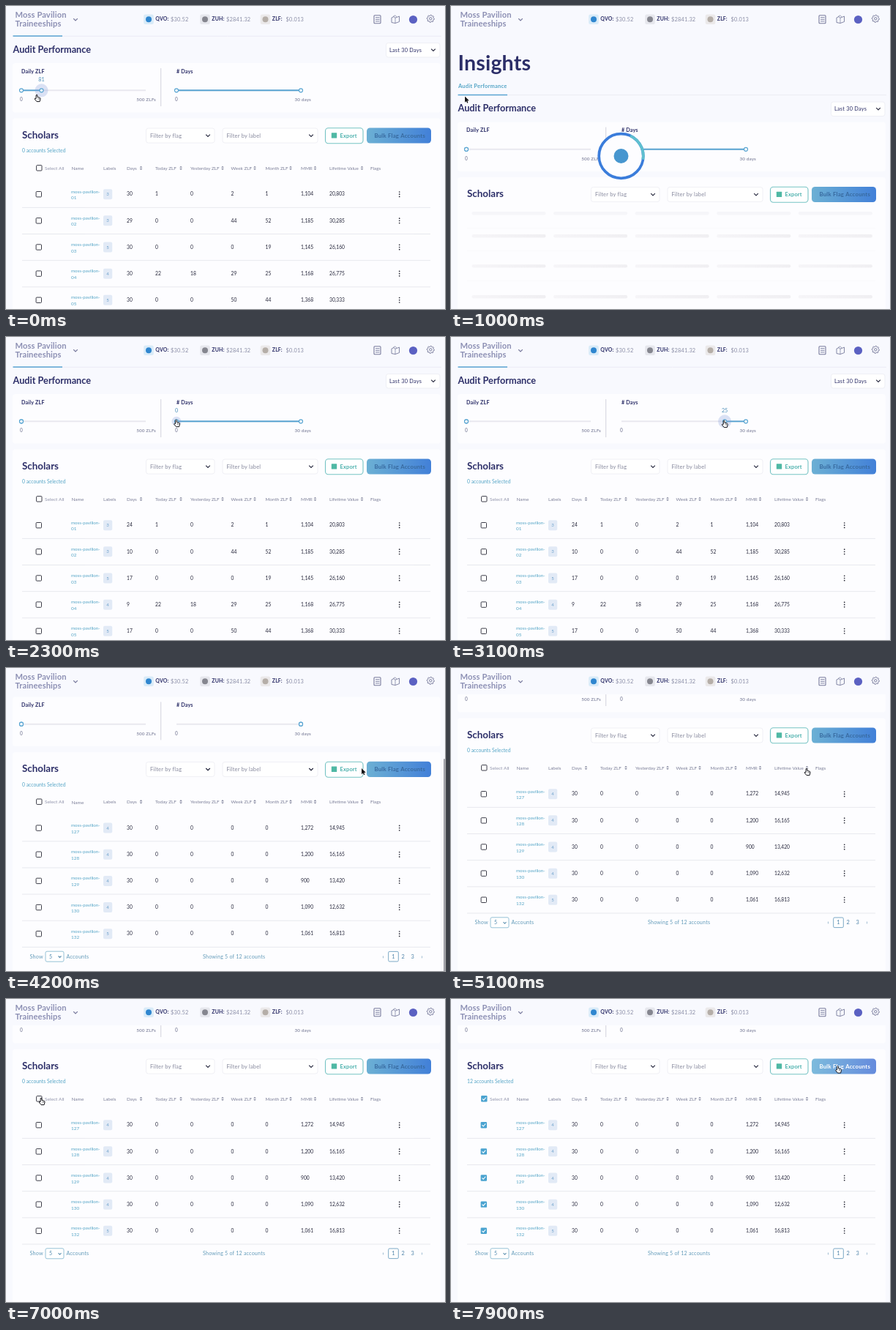
Animation, 600 px wide and 414 px high, one loop 8 s. Source, as an HTML page with a canvas:

```html
<!DOCTYPE html>
<html lang="en">
<head>
<meta charset="utf-8">
<title>Audit Performance</title>
<style>
html, body { margin: 0; width: 100%; height: 100%; overflow: hidden; background: #f8f9fe; }
canvas { display: block; width: 600px; height: 414px; }
</style>
</head>
<body>
<canvas id="stage"></canvas>
<script>
const W = 600, H = 414, LOOP = 8000, REST = 80.5;
const canvas = document.getElementById('stage');
const dpr = window.devicePixelRatio || 1;
canvas.width = W * dpr;
canvas.height = H * dpr;
const g = canvas.getContext('2d');

const NAVY = '#2c2e68', INK = '#303247', GREY = '#9093aa', TEAL = '#55a5c6', BLUE = '#5aa5d2';
const BG = '#f8f9fe', CARD = '#fdfdff', LINE = '#e6e7ed';
const COIN = 'ZLF';

// ---- motion ----
const clamp = (v, a = 0, b = 1) => Math.min(b, Math.max(a, v));
const mix = (a, b, k) => a + (b - a) * k;
const ease = k => k * k * (3 - 2 * k);
const within = (t, a, b) => t >= a && t < b;

function track(keys, t, curve = ease) {
  let i = keys.length - 1;
  while (i > 0 && keys[i][0] > t) i--;
  const a = keys[i], b = keys[i + 1];
  if (!b) return a.slice(1);
  const k = curve(clamp((t - a[0]) / (b[0] - a[0])));
  return a.slice(1).map((v, n) => mix(v, b[n + 1], k));
}

const POINTER = [
  [0, 42, 121], [600, 19, 123.5], [1500, 19, 123.5], [2150, 232.5, 113],
  [2400, 232.5, 113], [3350, 402, 114], [3650, 402, 114], [4120, 486, 137],
  [5350, 486, 137], [6600, 48, 135], [7230, 48, 135], [7800, 528.5, 91.5]
];
const HANDS = [[0, 800], [2100, 3550], [4600, 5450], [6500, 7300], [7650, 8000]];
const SCROLL = [[4000, REST], [4200, 119], [4650, 165.5]];

function stateAt(t) {
  const loading = within(t, 900, 1500) || within(t, 3600, 4000);
  return {
    t, loading,
    scroll: loading ? 0 : track(SCROLL, t, k => k)[0],
    daily: mix(48.5, 21, ease(clamp(t / 600))),
    days: mix(233, 403, ease(clamp((t - 2400) / 950))),
    dailyHover: t < 800,
    daysHover: within(t, 2150, 3550),
    pressed: t < 700 || within(t, 2400, 3450),
    checked: t >= 7200,
    pointer: track(POINTER, t),
    hand: HANDS.some(([a, b]) => within(t, a, b))
  };
}

// ---- drawing helpers ----
function text(s, x, y, size, color, { weight = 400, gap = 0, align = 'left' } = {}) {
  g.font = `${weight} ${size}px Lato, "Open Sans", sans-serif`;
  g.letterSpacing = gap + 'px';
  g.textAlign = align;
  g.fillStyle = color;
  g.fillText(s, x, y + size * 0.34);
}

function box(x, y, w, h, r, fill, stroke, lw = 1) {
  g.beginPath();
  g.roundRect(x, y, w, h, r);
  if (fill) { g.fillStyle = fill; g.fill(); }
  if (stroke) { g.strokeStyle = stroke; g.lineWidth = lw; g.stroke(); }
}

function path(pts, color, lw = 1) {
  g.beginPath();
  pts.forEach(([x, y]) => g.lineTo(x, y));
  g.strokeStyle = color;
  g.lineWidth = lw;
  g.stroke();
}

function dot(x, y, r, fill, stroke, lw = 1) {
  g.beginPath();
  g.arc(x, y, r, 0, Math.PI * 2);
  if (fill) { g.fillStyle = fill; g.fill(); }
  if (stroke) { g.strokeStyle = stroke; g.lineWidth = lw; g.stroke(); }
}

function fade(x, w, from, to) {
  const f = g.createLinearGradient(x, 0, x + w, 0);
  f.addColorStop(0, from);
  f.addColorStop(1, to);
  return f;
}

const chevron = (x, y, color = INK, r = 2.8) =>
  path([[x - r, y - r / 2], [x, y + r / 2], [x + r, y - r / 2]], color, 1.3);

function sorter(x, y) {
  g.fillStyle = '#85889f';
  for (const d of [-1, 1]) {
    g.beginPath();
    g.moveTo(x - 1.9, y + d * 0.6);
    g.lineTo(x + 1.9, y + d * 0.6);
    g.lineTo(x, y + d * 2.7);
    g.fill();
  }
}

function checkbox(x, y, on) {
  if (!on) return box(x - 3.7, y - 3.7, 7.4, 7.4, 1, '#fff', '#3c3d49', 1);
  box(x - 4.2, y - 4.2, 8.4, 8.4, 1.2, '#4aa3d0');
  path([[x - 2.3, y], [x - 0.6, y + 1.8], [x + 2.5, y - 1.8]], '#fff', 1.1);
}

// ---- page parts ----
function header() {
  g.fillStyle = BG;
  g.fillRect(0, 0, W, 36);
  const brand = { weight: 700, gap: 0.1 };
  text('Moss Pavilion', 12.5, 11.8, 11.2, '#8d90b4', brand);
  text('Traineeships', 12.5, 24.2, 11.2, '#8d90b4', brand);
  chevron(95, 18.5, '#77799d');
  const coins = [
    [195, 'QVO:', '$30.52', 225, '#2f86cf', '#d9ebf8'],
    [272, 'ZUH:', '$2841.32', 301, '#85868f', '#e6e7ed'],
    [354.5, COIN + ':', '$0.013', 382.5, '#b5aea8', '#ebe9ea']
  ];
  for (const [x, name, price, px, mark, back] of coins) {
    box(x - 6.8, 11.5, 13.6, 13.6, 2.5, back);
    dot(x, 18.3, 4, mark);
    text(name, x + 9.3, 18, 7, NAVY, { weight: 700, gap: 0.1 });
    text(price, px, 18, 7.4, '#8b8ea6', { gap: 0.2 });
  }
  const tone = '#787b9c';
  box(503, 12.8, 9, 11, 1, null, tone, 1.1);
  for (const y of [15.7, 18.3, 20.9]) path([[505, y], [510.5, y]], tone, 0.9);
  path([[527, 16], [530, 14.5], [532, 16.3], [537.5, 14], [537.5, 21.5], [532, 23.5], [527, 22.5], [527, 16]], tone, 0.9);
  path([[532, 16.3], [532, 23.5]], tone, 0.7);
  path([[529, 14.5], [532, 12.7], [534, 15]], tone, 0.7);
  dot(556.5, 18.5, 5.6, '#5b61c2');
  dot(580.3, 17.3, 1.7, null, tone, 1);
  g.beginPath();
  for (let i = 0; i <= 32; i++) {
    const a = i / 32 * Math.PI * 2, r = i % 4 < 2 ? 5.1 : 4;
    g.lineTo(580.3 + r * Math.cos(a), 17.3 + r * Math.sin(a));
  }
  g.stroke();
}

// `held` is the handle under the pointer: its x, value and halo radius
function slider(x, label, low, high, handles, fill, held) {
  const end = x + 170, y = 115.3;
  text(label, x, 89.3, 7.2, NAVY, { weight: 700, gap: 0.15 });
  path([[x, y], [end, y]], '#e9e8ef', 2);
  path(fill.map(v => [v, y]), BLUE, 1.9);
  if (held) {
    dot(held.x, y, held.r, 'rgba(130,155,215,.28)');
    text(held.value, held.x, 101, 7.2, '#4d8fb8', { align: 'center' });
  }
  for (const h of handles) dot(h, y, 2.5, '#fff', BLUE, 1.2);
  text(low, x - 2, 128, 6.6, GREY, { weight: 700 });
  text(high, end + 14, 128, 6.4, GREY, { align: 'right', weight: 700, gap: 0.1 });
}

function sliders(s) {
  const held = (on, x, from, max) => on &&
    { x, value: Math.round((x - from) / 170 * max), r: s.pressed ? 9 : 6.5 };
  slider(21, `Daily ${COIN}`, '0', `500 ${COIN}s`, [21, s.daily], [21, s.daily],
    held(s.dailyHover, s.daily, 21, 500));
  slider(233, '# Days', '0', '30 days', [s.days, 403], [s.days, 403],
    held(s.daysHover, s.days, 233, 30));
}

function filters(s) {
  text('Scholars', 22, 176.3, 13.4, NAVY, { weight: 700 });
  for (const [x, w, label] of [[191.5, 93.5, 'Filter by flag'], [296, 130, 'Filter by label']]) {
    box(x, 167, w, 20, 3, '#fff', '#f0f0f5');
    text(label, x + 5.5, 177, 7.4, '#85879c', { gap: 0.2 });
    chevron(x + w - 9, 177);
  }
  box(436.5, 166.8, 51.5, 21, 4, '#fff', '#76c3c4', 1.1);
  box(444.8, 173.2, 7.4, 7.4, 0.5, '#4fb8a4');
  text('Export', 456.5, 177, 7.4, '#4ab0ac', { weight: 700, gap: 0.2 });
  const [from, to] = s.checked ? ['#7dbbdc', '#658bdd'] : ['#6cb0d4', '#4280d8'];
  box(493, 166.4, 88, 21.2, 4.5, fade(493, 88, from, to));
  text('Bulk Flag Accounts', 503.5, 177, 7.8, s.checked ? '#fff' : '#386a9f', { weight: 700, gap: 0.2 });
}

const COLS = [165, 204, 252, 307.5, 354.5, 403, 442];
const HEADS = [
  ['Days', 184.5], [`Today ${COIN}`, 239], [`Yesterday ${COIN}`, 296], [`Week ${COIN}`, 340],
  [`Month ${COIN}`, 389], ['MMR', 422.5], ['Lifetime Value', 486.5]
];
// id, labels, days, today, yesterday, week, month, rating, lifetime
const FIRST = `01 3 30 1 0 2 1 1,104 20,803
02 3 29 0 0 44 52 1,185 30,285
03 5 30 0 0 0 19 1,145 26,160
04 4 30 22 18 29 25 1,168 26,775
05 5 30 0 0 50 44 1,368 30,333`.split('\n').map(r => r.split(' '));
const LAST = `127 4 30 0 0 0 0 1,272 14,945
128 4 30 0 0 0 0 1,200 16,165
129 4 30 0 0 0 0 900 13,420
130 4 30 0 0 0 0 1,090 12,632
132 5 30 0 0 0 0 1,061 16,813`.split('\n').map(r => r.split(' '));
const ACTIVE_DAYS = [24, 10, 17, 9, 17];

function table(s) {
  const rows = s.t < 3600 ? FIRST : LAST;
  text(`${s.checked ? 12 : 0} accounts Selected`, 22, 198, 6.8, TEAL);
  checkbox(45.3, 221.3, s.checked);
  text('Select All', 53, 221.5, 6.5, GREY);
  text('Name', 89.5, 222, 6.5, '#7c7f98');
  text('Labels', 133, 221.5, 6.3, '#7c7f98');
  HEADS.forEach(([label, sx], i) => {
    text(label, COLS[i], 221.5, 6.4, '#7c7f98');
    sorter(sx, 221.4);
  });
  text('Flags', 498, 221.5, 6.4, '#7c7f98');

  rows.forEach(([id, labels, ...cells], i) => {
    const y = 257.2 + 36.15 * i;
    if (s.t >= 1500 && s.t < 3600) cells[0] = ACTIVE_DAYS[i];
    checkbox(44.8, y, s.checked);
    text('moss-pavilion-', 89, y - 3.6, 6.2, TEAL);
    text(id, 89, y + 4.9, 6.4, TEAL);
    box(133, y - 7, 12.2, 14, 2, '#e2eaf6');
    text(labels, 139.1, y, 6, '#6b9fca', { align: 'center' });
    cells.forEach((c, n) => text(c, COLS[n], y, 6.7, '#25263a'));
    for (const d of [-3.2, 0, 3.2]) dot(537.7, y + d, 0.85, '#292a36');
    path([[22, y + 18.2], [580, y + 18.2]], LINE, 0.9);
  });
  pager();
}

function pager() {
  const y = 432.8, soft = { gap: 0.2 };
  text('Show', 32.5, y, 7.2, '#649cba', soft);
  box(54, y - 7, 25, 14, 2, '#fff', '#8bbbd2', 0.9);
  text('5', 59, y, 7, '#4d86ac');
  chevron(73.5, y + 0.3, '#6a99b6', 2);
  text('Accounts', 82.5, y, 7.2, '#649cba', soft);
  text('Showing 5 of 12 accounts', 269, y, 7.1, '#649cba', soft);
  box(522.7, y - 6.8, 13.6, 13.6, 1.5, '#fff', '#6d9fc0', 0.9);
  ['‹', '1', '2', '3', '›'].forEach((c, i) =>
    text(c, [515.5, 529.5, 542.7, 555.7, 568.5][i], y, 7.4, '#4d82a8', { align: 'center' }));
}

function skeleton() {
  [202.5, 233.5, 274.7, 316.5].forEach((y, r) => {
    for (let c = 0; c < 5; c++) {
      const x = 28.5 + c * 111.6;
      box(x, y - 2, 101, 4.4, 2, r ? fade(x, 101, '#f6f5f8', '#f0eff2') : '#f6f6f9');
    }
    path([[22, y + 20.5], [580, y + 20.5]], '#f9f9fc', 1);
  });
}

function page(s) {
  g.save();
  g.translate(0, REST - s.scroll);
  text('Insights', 9.5, -2.6, 28.5, NAVY, { weight: 700, gap: 0.2 });
  text('Audit Performance', 10, 28.5, 7.5, TEAL, { weight: 700, gap: 0.2 });
  path([[10, 41.2], [595, 41.2]], '#eaebf4', 0.9);
  path([[9.5, 41], [77, 41]], BLUE, 1.3);
  text('Audit Performance', 9.5, 59.5, 12.7, NAVY, { weight: 700 });
  box(519.5, 50.5, 73.5, 19.5, 3, '#fff', '#eeeff5');
  text('Last 30 Days', 524, 60, 7.4, NAVY, { gap: 0.2 });
  chevron(584, 60);

  box(9, 78, 585, 67.5, 4, CARD);
  path([[211.7, 85], [211.7, 137]], '#d3d3de', 1);
  sliders(s);

  box(9, 153.5, 585, 420, 4, CARD);
  filters(s);
  if (s.loading) skeleton(); else table(s);
  g.restore();
}

function loader(t) {
  const x = 232.5, y = 205, a = t / 1000 * Math.PI * 2;
  dot(x, y, 30.3, '#fdfdff', '#3b7ddb', 3.7);
  g.beginPath();
  g.arc(x, y, 30.3, a - 1.15, a + 0.15);
  g.strokeStyle = '#5fc0cf';
  g.stroke();
  dot(x, y, 10, '#4796cf');
}

function scrollbar(s) {
  g.globalAlpha = clamp((s.t - 3980) / 80) * clamp((5000 - s.t) / 250);
  box(598, 124 + (s.scroll - 119) * 0.8, 2, 300, 1, '#a3a3ab');
  g.globalAlpha = 1;
}

function pointer([x, y], hand) {
  g.save();
  g.translate(x, y);
  g.lineJoin = 'round';
  g.beginPath();
  if (hand) {
    g.moveTo(-0.9, 5.5);
    g.lineTo(-0.9, 0.8);
    g.quadraticCurveTo(0, -0.7, 0.9, 0.8);
    g.lineTo(0.9, 3.4);
    g.lineTo(4.2, 4.2);
    g.quadraticCurveTo(5.2, 4.6, 5, 6);
    g.lineTo(4.1, 9.6);
    g.lineTo(0, 9.6);
    g.lineTo(-2.9, 6);
    g.quadraticCurveTo(-2.4, 4.5, -0.9, 5.5);
    g.fillStyle = '#fff';
    g.strokeStyle = '#16161c';
    g.lineWidth = 1;
    g.closePath();
    g.fill();
    g.stroke();
    path([[2, 5], [2, 6.5]], '#16161c', 0.6);
    path([[3.4, 5.2], [3.4, 6.6]], '#16161c', 0.6);
  } else {
    [[0, 0], [0, 8.2], [1.9, 6.5], [3.1, 9.2], [4.4, 8.6], [3.2, 6], [5.7, 5.8]].forEach(p => g.lineTo(...p));
    g.closePath();
    g.strokeStyle = '#fff';
    g.lineWidth = 1.2;
    g.stroke();
    g.fillStyle = '#101014';
    g.fill();
  }
  g.restore();
}

function draw(now) {
  const s = stateAt(now % LOOP);
  g.setTransform(dpr, 0, 0, dpr, 0, 0);
  g.fillStyle = BG;
  g.fillRect(0, 0, W, H);
  page(s);
  header();
  if (s.loading) loader(s.t);
  scrollbar(s);
  pointer(s.pointer, s.hand);
}

const start = performance.now();
function tick() {
  draw(performance.now() - start);
  requestAnimationFrame(tick);
}
tick();
</script>
</body>
</html>
```
